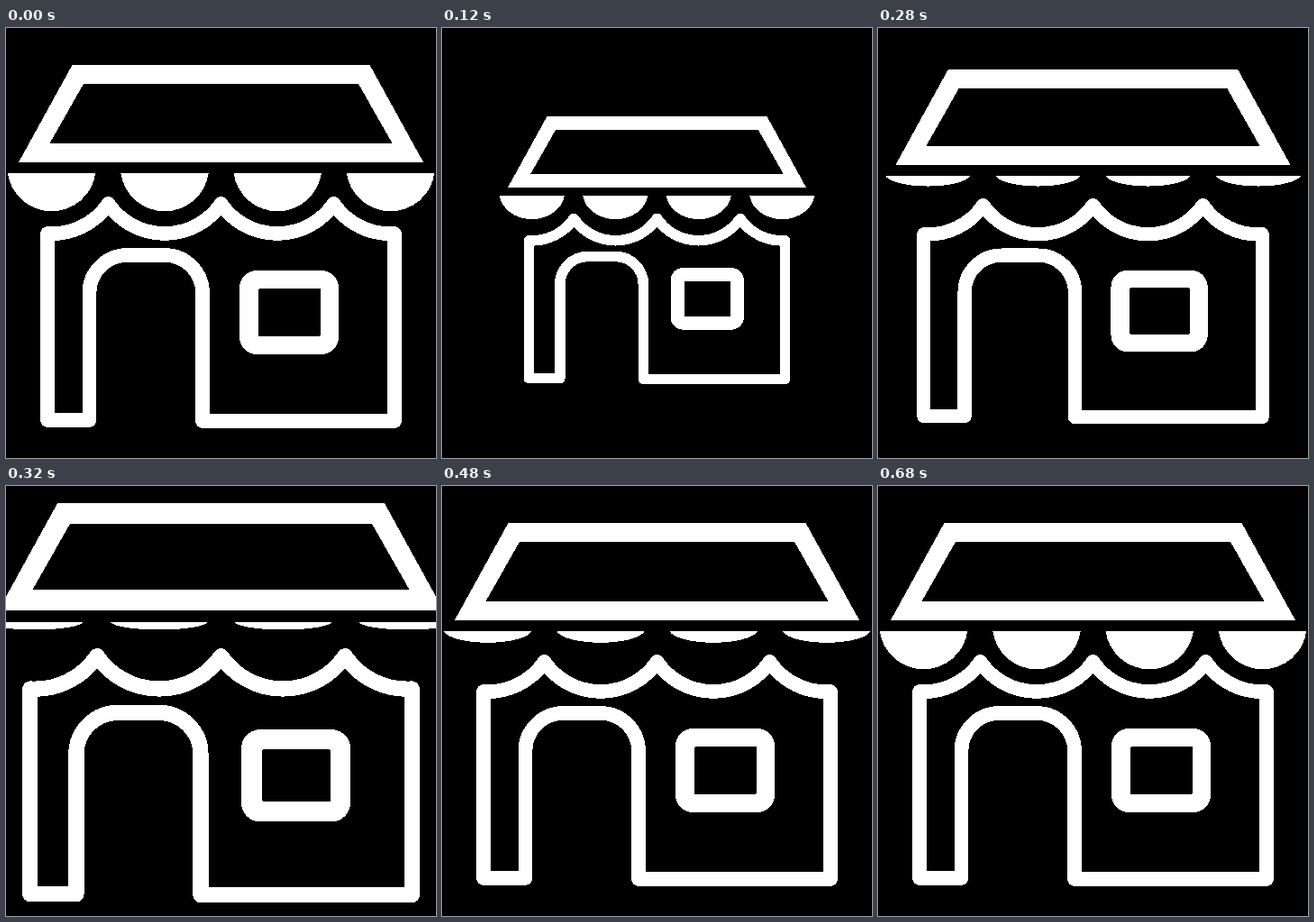
Animation of 477x477 px, one loop 1040 ms. Source, as an HTML page:

```html
<!DOCTYPE html>
<html lang="en">
<head>
<meta charset="utf-8">
<title>Shop icon</title>
<style>
  html, body { margin: 0; width: 100%; height: 100%; overflow: hidden; background: #000; }
  svg { display: block; width: 100%; height: 100%; }
</style>
</head>
<body>
<svg viewBox="0 0 477 477" fill="#fff" shape-rendering="crispEdges">
  <g id="shop">
    <path fill-rule="evenodd" d="M73.5 41H403.5L463 149H14Z M86 62L48.5 128H428.5L391 62Z"/>
    <g id="awning"></g>
    <path fill="none" stroke="#fff" stroke-width="15.7" stroke-linejoin="round"
      d="M46 228A75.7 75.7 0 0 0 113.5 195A75.7 75.7 0 0 0 238.5 195A75.7 75.7 0 0 0 363.5 195A75.7 75.7 0 0 0 431 228
         V436H218V294A42 42 0 0 0 176 252H134.5A42 42 0 0 0 92.5 294V435H46Z"/>
    <rect x="259" y="269" width="110" height="93" rx="19"/>
    <rect x="280" y="289" width="69" height="53" rx="2" fill="#000"/>
  </g>
</svg>
<script>
const LOOP = 1040, STEP = 40;
const CX = 238.5, CY = 257.7, AWNING_TOP = 161.1;
const shop = document.getElementById('shop');
const awning = document.getElementById('awning');

// [time in ms, value]
const shopKeys = [[0, 1], [200, 0.6], [320, 1.1], [440, 1]];
const awningKeys = [[0, 1], [440, 0], [560, 1.2], [680, 1]];

const ease = p => (1 - Math.cos(Math.PI * p)) / 2;

function valueAt(keys, t) {
  for (let i = 1; i < keys.length; i++) {
    const [t0, a] = keys[i - 1], [t1, b] = keys[i];
    if (t < t1) return a + (b - a) * ease((t - t0) / (t1 - t0));
  }
  return keys[keys.length - 1][1];
}

// Four circle segments hanging from the awning line
awning.innerHTML = [50.6, 176, 301.2, 426.6].map(x =>
  `<path d="M${x - 48.7} 0A49.2 49.2 0 0 0 ${x + 48.7} 0Z"/>`).join('');

function draw(t) {
  const s = valueAt(shopKeys, t);
  const k = valueAt(awningKeys, t);
  shop.setAttribute('transform', `translate(${CX} ${CY}) scale(${s}) translate(${-CX} ${-CY})`);
  awning.setAttribute('transform', `translate(0 ${AWNING_TOP}) scale(1 ${k})`);
}

const start = performance.now();
function tick() {
  const t = (performance.now() - start) % LOOP;
  draw(Math.floor(t / STEP) * STEP);
  requestAnimationFrame(tick);
}
tick();
</script>
</body>
</html>
```
